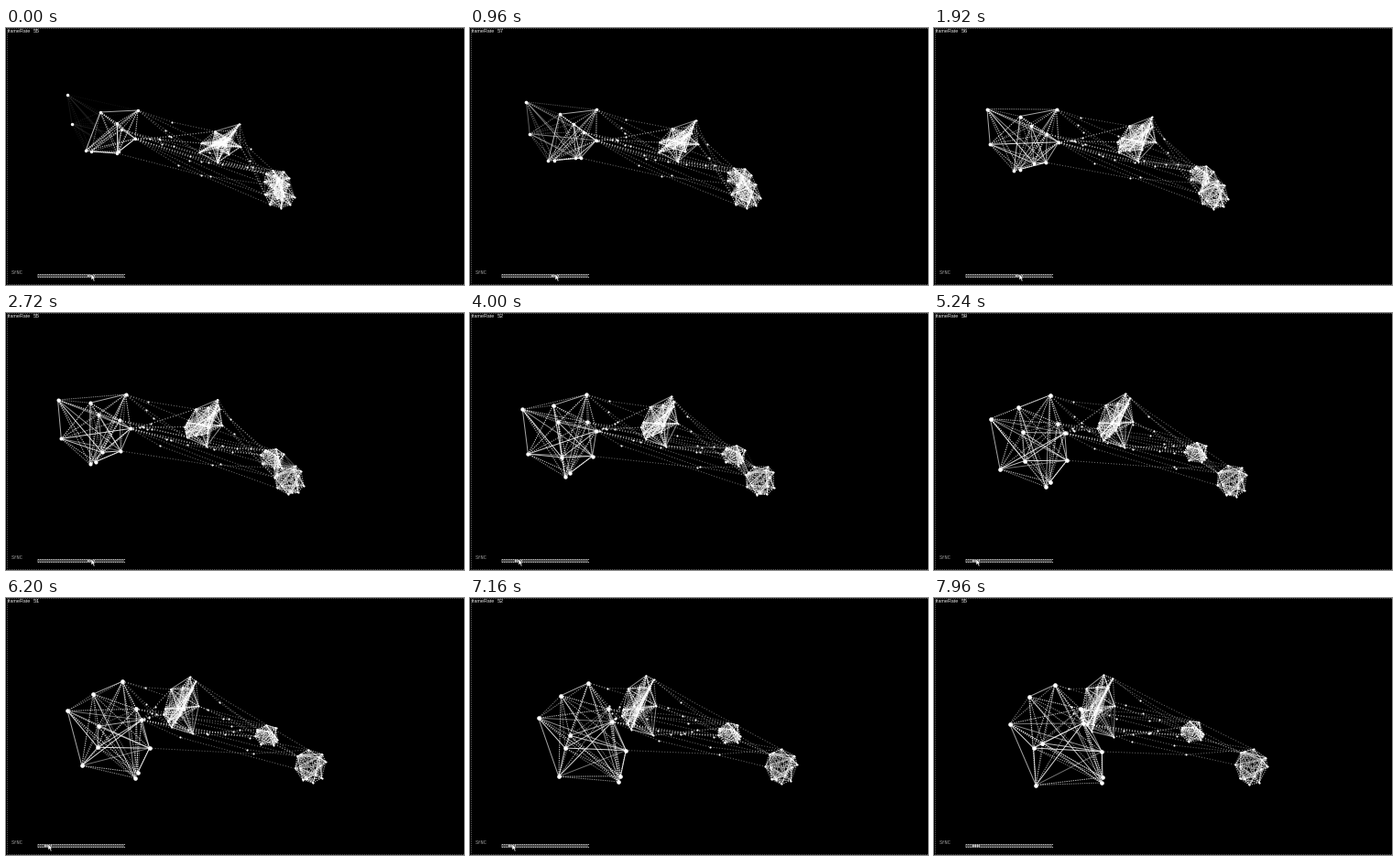
A matplotlib script for the animation above (8000 ms loop, 500 by 281 pixels).

```python
import numpy as np
import matplotlib.pyplot as plt
from matplotlib.animation import FuncAnimation
from matplotlib.collections import LineCollection
from matplotlib.patches import Polygon, Rectangle

W, H, DPI = 500, 281, 100
FRAMES, STEP = 200, 40
PX = 72 / DPI
rng = np.random.default_rng(8)

# Outline nodes: x, y at the start and at the end of the loop
WEB = np.array([
    (72, 105, 112, 205), (67, 73, 83, 138), (103, 92, 104, 108),
    (121, 104, 119, 159), (123, 135, 109, 164), (144, 90, 132, 95),
    (126, 111, 160, 121), (141, 121, 163, 137), (87, 134, 184, 202),
    (93, 135, 185, 196), (121, 137, 184, 168)], float)
MIDDLE = np.array([
    (255, 105, 185, 84), (250, 112, 195, 88), (256, 130, 197, 118),
    (228, 113, 166, 99), (213, 126, 160, 131), (211, 136, 172, 146),
    (231, 147, 196, 152), (243, 138, 175, 128)], float)


def web_nodes(u):
    """Each node spirals around a drifting centre."""
    start = WEB[:, 0] + 1j * WEB[:, 1] - (110 + 115j)
    end = WEB[:, 2] + 1j * WEB[:, 3] - (134 + 150j)
    z = start * (end / start) ** u + 110 - 38 * u + 62 * u * u
    return np.column_stack([z.real, z.imag + 115 + 35 * u])


def middle_nodes(u):
    pts = MIDDLE[:, :2] * (1 - u) + MIDDLE[:, 2:] * u
    pts[:, 1] -= 14 * u * (1 - u)
    return pts


def ring(n, start, end, r_start, r_end, spin):
    """A jagged ellipse that drifts, grows and turns slowly."""
    angle = 2 * np.pi * (np.arange(n) + rng.uniform(-0.25, 0.25, n)) / n
    reach = rng.uniform(0.85, 1.1, n)[:, None]
    start, end, r0, r1 = map(np.array, (start, end, r_start, r_end))

    def nodes(u):
        a = angle + spin * u
        unit = np.column_stack([np.cos(a), np.sin(a)]) * reach
        return start + (end - start) * u + unit * (r0 + (r1 - r0) * u)
    return nodes


upper_nodes = ring(7, (295, 165), (282, 146), (15, 11), (14, 13), -0.9)
lower_nodes = ring(8, (299, 183), (346, 185), (17, 16), (19, 21), 0.9)


def inner_mix(outline, count):
    """Weights that place inner nodes on random chords of the outline."""
    mix = np.zeros((count, outline))
    for row in mix:
        i, j = rng.choice(outline, 2, replace=False)
        row[i] = rng.uniform(0.2, 0.8)
        row[j] = 1 - row[i]
    return mix


MIX = {"b": inner_mix(8, 11), "c": inner_mix(7, 5), "d": inner_mix(8, 6)}


def nodes(t):
    u = t / 8000
    p = {"a": web_nodes(u), "b": middle_nodes(u),
         "c": upper_nodes(u), "d": lower_nodes(u ** 1.4)}
    spread = np.interp(t, [0, 2200], [0.45, 1])
    for name, mix in MIX.items():
        mid = p[name].mean(axis=0)
        p[name] = np.vstack([p[name], mid + spread * (mix @ p[name] - mid)])
    return p


def make_strands():
    """Threads between clusters: end nodes, bead position and sag."""
    kinds = [("a", (5, 6, 7), "b", (3, 4, 5), 7),
             ("a", (5, 6, 7), "c", (0, 3, 4), 8),
             ("a", (6, 7, 10), "d", (3, 4, 5), 5),
             ("b", (1, 2, 6), "c", (4, 5), 3),
             ("b", (0, 1, 2), "d", (4, 5, 6), 4)]
    out = []
    for g0, from_ids, g1, to_ids, count in kinds:
        for _ in range(count):
            out.append((g0, rng.choice(from_ids), g1, rng.choice(to_ids),
                        rng.uniform(0.12, 0.75), rng.normal(2, 4)))
    return out


STRANDS = make_strands()


def strand_paths(p, u):
    paths = []
    for g0, i, g1, j, f, sag in STRANDS:
        a, b = p[g0][i], p[g1][j]
        f = f + 0.08 * np.sin(2 * np.pi * (u + f))
        paths.append(np.array([a, a + f * (b - a) + (0, sag), b]))
    return paths


def mesh(pts):
    i, j = np.triu_indices(len(pts), 1)
    segs = np.stack([pts[i], pts[j]], axis=1)
    return i, j, segs, np.hypot(*(pts[i] - pts[j]).T)


fig = plt.figure(figsize=(W / DPI, H / DPI), dpi=DPI, facecolor="black")
ax = fig.add_axes([0, 0, 1, 1])
ax.set_xlim(0, W)
ax.set_ylim(H, 0)
ax.axis("off")


def lines(styles):
    lc = LineCollection([], linewidths=PX, linestyles=styles)
    ax.add_collection(lc)
    return lc


def dots():
    return ax.scatter([], [], c="white", linewidths=0, zorder=4)


def label(x, y, text, size, color, font):
    return ax.text(x, y, text, fontsize=size * PX, color=color,
                   family=font, va="center", ha="left")


DOTTED = (0, (1.3, 1.1))
strand_lines = lines([(0, (1, 2))])
mesh_lines = lines(["solid", DOTTED, DOTTED])
big_dots, small_dots, beads = dots(), dots(), dots()

# Stage edge, slider and labels
xs, ys = np.arange(0, W, 2) + 0.5, np.arange(0, H, 2) + 0.5
for x, y in ((xs, 0 * xs + 0.5), (xs, 0 * xs + H - 0.5), (0 * ys + 0.5, ys)):
    ax.plot(x, y, ",", color="0.35")
ax.add_patch(Rectangle((34, 269), 95, 4, fc="0.28", ec="none"))
bar = np.arange(34, 129, 2) + 0.5
for y in (269.5, 272.5):
    ax.plot(bar, 0 * bar + y, ",", color="0.75")
handle, = ax.plot([], [], color="0.8", lw=2 * PX, ls=(0, (0.8, 0.4)))
label(6, 267.5, "SYNC", 5.4, "0.6", "Liberation Mono")
label(2, 3.7, "frameRate", 5.4, "0.9", "Liberation Sans")
rate = label(30, 3.7, "", 6, "0.9", "Liberation Mono")

ARROW = np.array([(0, 0), (0, 6.5), (1.6, 5.2), (2.8, 8), (4, 7.4),
                  (2.8, 4.8), (4.8, 4.6)])
cursor = Polygon(ARROW, fc="white", ec="black", lw=0.4 * PX, zorder=6)
ax.add_patch(cursor)


def set_dots(sc, pts, diameter):
    sc.set_offsets(pts)
    sc.set_sizes([(diameter * PX) ** 2])


def draw(frame):
    t = frame * STEP
    u = t / 8000
    p = nodes(t)
    right = np.vstack([p["c"], p["d"]])
    split = len(p["c"])

    # The two outlying web nodes join their cluster late
    join = np.ones(len(p["a"]))
    join[:2] = np.interp(t, [0, 1900], [0.12, 1])
    i, j, web_segs, _ = mesh(p["a"])
    web_alpha = (0.45 + 0.1 * ((i + 2 * j) % 5)) * np.minimum(join[i], join[j])

    _, _, mid_segs, d = mesh(p["b"])
    mid_alpha = 0.95 - d / 70

    i, j, right_segs, d = mesh(right)
    same = (i < split) == (j < split)
    right_alpha = np.where(same, 0.95 - d / 60, 0.9 - d / 28)

    alpha = np.concatenate([web_alpha, mid_alpha, right_alpha]).clip(0, 1)
    colors = np.ones((len(alpha), 4))
    colors[:, 3] = alpha
    mesh_lines.set_segments(np.concatenate([web_segs, mid_segs, right_segs]))
    mesh_lines.set_color(colors)

    paths = strand_paths(p, u)
    strand_lines.set_segments(paths)
    strand_lines.set_color((1, 1, 1, 0.45))

    set_dots(big_dots, p["a"], 3.4 + 1.2 * min(1, 1.6 * u))
    set_dots(small_dots, np.vstack([p["b"], right]), 2.2)
    set_dots(beads, [path[1] for path in paths[:-3]], 2.1)

    value = 53.5 + 3.4 * np.cos(2 * np.pi * (u - 0.175))
    rate.set_text(f"{value + 0.6 * np.sin(frame * 0.9):.0f}")

    x = np.interp(t, [2760, 3800, 4300, 4800], [93, 53, 53, 46])
    handle.set_data([x - 4.5, x + 4], [271, 271])
    cursor.set_xy(ARROW + (x, 269))
    cursor.set_visible(t < 7700)
    return []


anim = FuncAnimation(fig, draw, frames=FRAMES, interval=STEP,
                     repeat=True, repeat_delay=0, blit=False)
plt.show()
```
